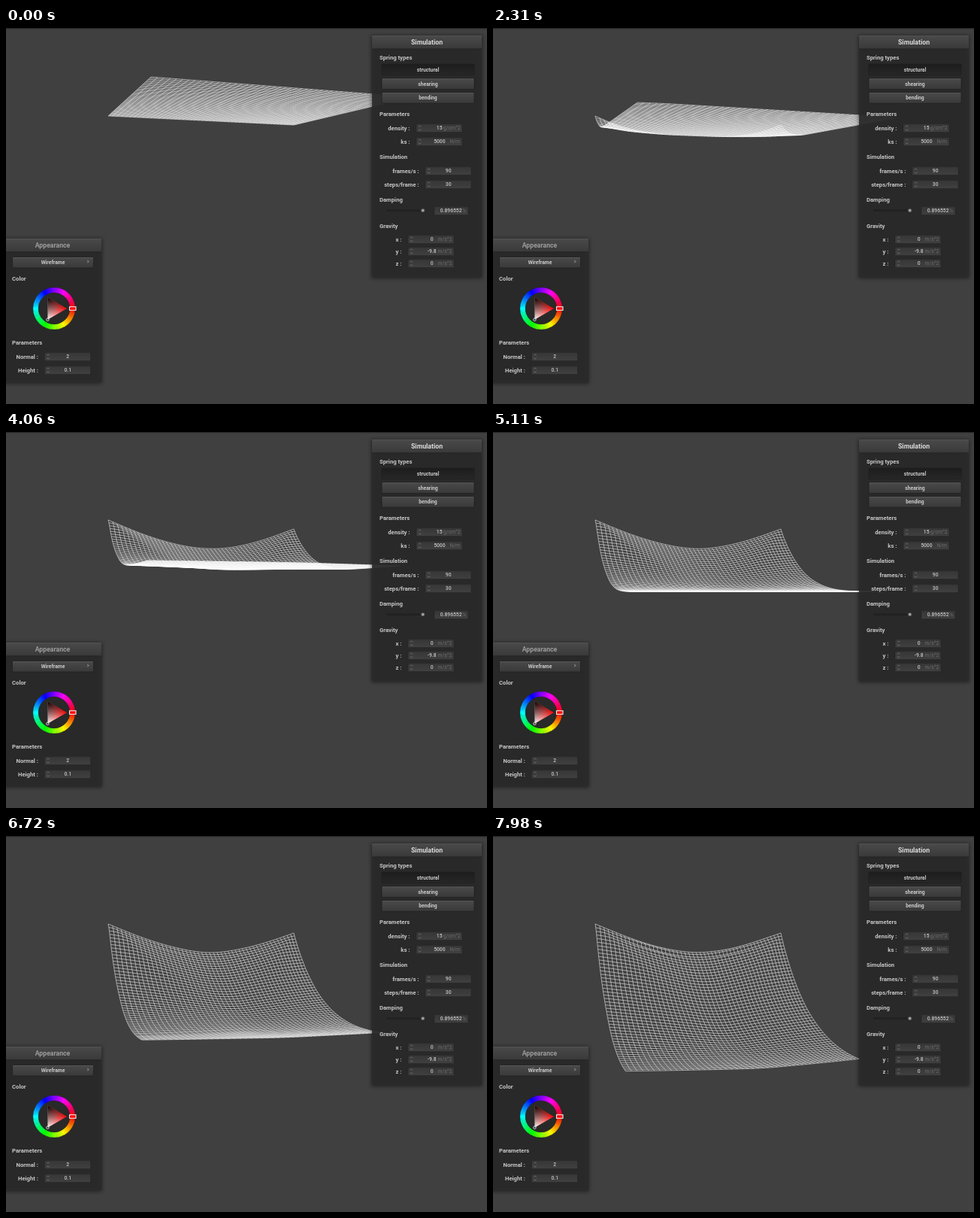
Recreate the animation shown at these times as an HTML page with a canvas. Size 640 by 500 pixels, loop 8 s.

```html
<!DOCTYPE html>
<html lang="en">
<head>
<meta charset="utf-8">
<title>Cloth simulation</title>
<style>
  html, body { margin: 0; width: 100%; height: 100%; overflow: hidden; background: #404040; }
  canvas, svg { position: absolute; left: 0; top: 0; width: 640px; height: 500px; }
  text { font-family: Roboto, sans-serif; dominant-baseline: central; }
</style>
</head>
<body>
<canvas id="view" width="640" height="500"></canvas>
<svg id="ui" viewBox="0 0 640 500">
  <defs>
    <linearGradient id="raised" x2="0" y2="1"><stop stop-color="#4a4a4a"/><stop offset="1" stop-color="#393939"/></linearGradient>
    <linearGradient id="pushed" x2="0" y2="1"><stop stop-color="#1d1d1d"/><stop offset="1" stop-color="#272727"/></linearGradient>
    <linearGradient id="field" x2="0" y2="1"><stop stop-color="#363636"/><stop offset="1" stop-color="#404040"/></linearGradient>
    <linearGradient id="tint" gradientUnits="userSpaceOnUse" x1="17" y1="0" x2="-8.5" y2="14.7"><stop stop-color="#f00"/><stop offset="1" stop-color="#fff"/></linearGradient>
    <linearGradient id="shade" gradientUnits="userSpaceOnUse" x1="4.25" y1="7.4" x2="-8.5" y2="-14.7"><stop stop-opacity="0"/><stop offset="1"/></linearGradient>
    <filter id="blur" x="-20%" y="-20%" width="140%" height="140%"><feGaussianBlur stdDeviation="2.5"/></filter>
  </defs>
</svg>
<script>
// ---------- Control panels ----------
const ui = document.getElementById('ui');

function add(tag, attrs, content) {
  const el = document.createElementNS('http://www.w3.org/2000/svg', tag);
  for (const key in attrs) el.setAttribute(key, attrs[key]);
  if (content) el.textContent = content;
  ui.appendChild(el);
  return el;
}

function label(x, y, content, { size = 7.7, anchor = 'start', fill = '#c6c6c6', weight = 700 } = {}) {
  add('text', { x, y: y + 0.3, 'font-size': size, 'text-anchor': anchor, fill, 'font-weight': weight }, content);
}

function rect(x, y, width, height, fill, extra) {
  add('rect', { x, y, width, height, fill, rx: 1, ...extra });
}

function panel(x, y, width, height, title, titleColor) {
  rect(x - 1, y, width + 2, height + 2, '#000', { opacity: 0.45, filter: 'url(#blur)' });
  rect(x, y, width, height, '#2b2b2b', { opacity: 0.9 });
  rect(x, y, width, 18, 'url(#raised)');
  rect(x, y, width, 0.6, '#5c5c5c');
  rect(x, y + 17.6, width, 0.7, '#1d1d1d');
  label(x + width / 2, y + 9, title, { size: 8.7, anchor: 'middle', fill: titleColor });
}

function button(x, y, width, height, caption, style = 'raised') {
  rect(x, y, width, height, `url(#${style})`, { stroke: '#1e1e1e', 'stroke-width': 0.7 });
  if (style === 'raised') rect(x + 0.5, y + 0.6, width - 1, 0.6, '#5c5c5c');
  label(x + width / 2, y + height / 2, caption, { size: 6.75, anchor: 'middle', fill: '#cbcbcb' });
}

function field(x, y, width, value, valueEnd, unit, unitX, spinner = true) {
  rect(x, y - 5.5, width, 11, 'url(#field)', { stroke: '#272727', 'stroke-width': 0.6 });
  label(valueEnd, y, value, { size: 6.75, anchor: 'end', weight: 500 });
  if (unit) label(unitX, y, unit, { size: 6.75, fill: '#6c6c6c', weight: 400 });
  if (spinner) {
    const d = `M${x + 3} ${y - 1.5}l1.6 -1.7l1.6 1.7M${x + 3} ${y + 1.5}l1.6 1.7l1.6 -1.7`;
    add('path', { d, fill: 'none', stroke: '#858585', 'stroke-width': 0.7 });
  }
}

function row(name, nameEnd, y, ...fieldArgs) {
  const [x, ...rest] = fieldArgs;
  label(nameEnd, y, name + ' :', { anchor: 'end' });
  field(x, y, 61, ...rest);
}

function colorWheel(cx, cy) {
  const first = ui.childElementCount;
  const steps = 72, radius = 24.5;
  const point = i => {
    const a = i / steps * 2 * Math.PI;
    return `${radius * Math.cos(a)} ${radius * Math.sin(a)}`;
  };
  for (let i = 0; i < steps; i++) {
    add('path', {
      d: `M${point(i - 0.55)}A${radius} ${radius} 0 0 1 ${point(i + 0.55)}`,
      stroke: `hsl(${i * 360 / steps} 100% 50%)`, 'stroke-width': 7.2, fill: 'none'
    });
  }
  for (const r of [20.8, 28.2]) add('circle', { r, fill: 'none', stroke: '#222', 'stroke-width': 0.5 });
  const triangle = 'M17 0L-8.5 14.7V-14.7Z';
  add('path', { d: triangle, fill: 'url(#tint)' });
  add('path', { d: triangle, fill: 'url(#shade)' });
  add('rect', { x: 20.5, y: -2.3, width: 8.5, height: 4.6, fill: '#f00', stroke: '#eee', 'stroke-width': 1.1 });
  add('circle', { cx: -8.6, cy: 14.8, r: 1.8, fill: 'none', stroke: '#ddd', 'stroke-width': 0.9 });
  [...ui.children].slice(first).forEach(el => el.setAttribute('transform', `translate(${cx} ${cy})`));
}

rect(0, 0, 640, 1.2, '#262626', { rx: 0 });

panel(487, 10, 146, 321, 'Simulation', '#dcdcdc');
label(497, 39, 'Spring types');
button(500, 48, 123, 14.5, 'structural', 'pushed');
button(500, 67, 123, 14.5, 'shearing');
button(500, 85.7, 123, 14.5, 'bending');
label(497, 114, 'Parameters');
row('density', 537.5, 133, 546, '15', 580.5, 'g/cm^2', 582);
row('ks', 537.5, 151, 546, '5000', 584.5, 'N/m', 590.5);
label(497, 171, 'Simulation');
row('frames/s', 549.5, 190, 558, '90', 592.5);
row('steps/frame', 549.5, 208, 558, '30', 592.5);
label(497, 228, 'Damping');
rect(506, 241.5, 52, 2.6, '#212121');
add('circle', { cx: 554.7, cy: 242.6, r: 3.2, fill: '#555', stroke: '#1c1c1c', 'stroke-width': 0.7 });
add('circle', { cx: 554.7, cy: 242.6, r: 1.6, fill: '#a8a8a8' });
field(570, 243, 45, '0.896552', 606.5, '%', 607, false);
label(497, 263, 'Gravity');
row('x', 526.5, 281, 535, '0', 568.5, 'm/s^2', 574.5);
row('y', 526.5, 297, 535, '-9.8', 572.5, 'm/s^2', 574.5);
row('z', 526.5, 313, 535, '0', 568.5, 'm/s^2', 574.5);

panel(-3, 280, 130, 191, 'Appearance', '#9c9c9c');
button(8.5, 304.5, 108, 14.5, 'Wireframe');
add('path', { d: 'M108.3 309l1.6 1.6l-1.6 1.6', fill: 'none', stroke: '#c4c4c4', 'stroke-width': 0.8 });
label(8, 333, 'Color');
colorWheel(64, 373);
label(8, 418, 'Parameters');
row('Normal', 43, 437, 51.5, '2', 84);
row('Height', 43, 455, 51.5, '0.1', 87);

// ---------- Cloth: Verlet steps ----------
// Only structural springs pull; every spring type is limited to 10% stretch.
const N = 50, REST = 1 / (N - 1), STRETCH = 1.1;
const STEP = 1 / (90 * 30);
const GRAVITY = 9.8 * STEP * STEP;
const STIFFNESS = 5000 / (15 / (N * N)) * STEP * STEP;
const KEEP = 1 - 0.896552 / 100;

const pos = new Float64Array(3 * N * N);
const acc = new Float64Array(pos.length);
const free = new Uint8Array(pos.length).fill(1);

function connect(di, dj) {
  const links = [];
  for (let j = 0; j + dj < N; j++) {
    for (let i = Math.max(0, -di); i < N && i + di < N; i++) {
      const a = 3 * (j * N + i);
      links.push({ a, b: a + 3 * (dj * N + di), limit: STRETCH * REST * Math.hypot(di, dj) });
    }
  }
  return links;
}

const structural = [...connect(1, 0), ...connect(0, 1)];
const shearing = [...connect(1, 1), ...connect(-1, 1)];
const bending = [...connect(2, 0), ...connect(0, 2)];
const springs = [...structural, ...shearing, ...bending];

for (let n = 0; n < N * N; n++) {
  pos[3 * n] = n % N * REST;
  pos[3 * n + 2] = Math.floor(n / N) * REST;
}
for (const corner of [0, 3 * (N - 1)]) free.fill(0, corner, corner + 3);
const prev = pos.slice();

function stepCloth() {
  acc.fill(0);
  for (const { a, b } of structural) {
    const dx = pos[b] - pos[a], dy = pos[b + 1] - pos[a + 1], dz = pos[b + 2] - pos[a + 2];
    const f = STIFFNESS * (1 - REST / Math.sqrt(dx * dx + dy * dy + dz * dz));
    acc[a] += f * dx; acc[a + 1] += f * dy; acc[a + 2] += f * dz;
    acc[b] -= f * dx; acc[b + 1] -= f * dy; acc[b + 2] -= f * dz;
  }
  for (let k = 0; k < pos.length; k++) {
    if (!free[k]) continue;
    const old = pos[k];
    pos[k] += KEEP * (old - prev[k]) + acc[k] - (k % 3 === 1 ? GRAVITY : 0);
    prev[k] = old;
  }
  for (const { a, b, limit } of springs) {
    const dx = pos[b] - pos[a], dy = pos[b + 1] - pos[a + 1], dz = pos[b + 2] - pos[a + 2];
    const square = dx * dx + dy * dy + dz * dz;
    if (square <= limit * limit) continue;
    const share = (1 - limit / Math.sqrt(square)) / (free[a] + free[b]);
    const ca = share * free[a], cb = share * free[b];
    pos[a] += ca * dx; pos[a + 1] += ca * dy; pos[a + 2] += ca * dz;
    pos[b] -= cb * dx; pos[b + 1] -= cb * dy; pos[b + 2] -= cb * dz;
  }
}

// Perspective view with the eye level at y = 212
function project() {
  const points = new Float32Array(2 * N * N);
  for (let n = 0; n < N * N; n++) {
    const x = pos[3 * n], y = pos[3 * n + 1], z = pos[3 * n + 2];
    const depth = 0.010526 + 0.001522 * x - 0.003723 * z;
    points[2 * n] = 320 + (-1.9368 + 2.6958 * x + 1.0729 * z) / depth;
    points[2 * n + 1] = 212 - (1 + 2.89 * y) / depth;
  }
  return points;
}

// ---------- Playback ----------
const LOOP = 8000, FRAME = 70, RELEASE = 1320, STEPS_PER_MS = 0.638;
const poses = [];
let stepsDone = 0;

function poseAt(frame) {
  while (poses.length <= frame) {
    const wanted = Math.round((poses.length * FRAME - RELEASE) * STEPS_PER_MS);
    for (; stepsDone < wanted; stepsDone++) stepCloth();
    poses.push(project());
  }
  return poses[frame];
}

const ctx = document.getElementById('view').getContext('2d');
ctx.strokeStyle = '#fff';
ctx.lineWidth = 0.53;
ctx.lineJoin = 'bevel';

function thread(points, start, stride) {
  ctx.beginPath();
  for (let k = 0; k < N; k++) {
    const n = 2 * (start + k * stride);
    ctx.lineTo(points[n], points[n + 1]);
  }
  ctx.stroke();
}

let shown = -1;
function draw() {
  const frame = Math.floor(performance.now() % LOOP / FRAME);
  if (frame !== shown) {
    shown = frame;
    const points = poseAt(frame);
    ctx.clearRect(0, 0, 640, 500);
    for (let k = 0; k < N; k++) {
      thread(points, k * N, 1);
      thread(points, k, N);
    }
  }
  requestAnimationFrame(draw);
}
draw();
</script>
</body>
</html>
```
